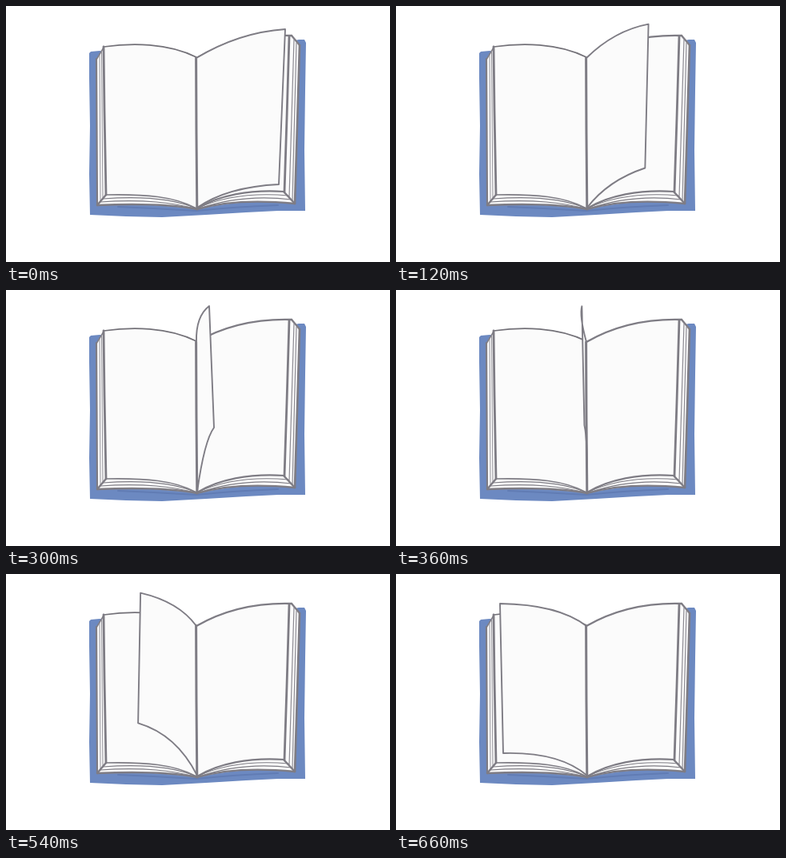
These frames come from a looping animation (480x320 px, 0.72 s). An HTML page with a canvas:

```html
<!DOCTYPE html>
<html lang="en">
<head>
<meta charset="utf-8">
<title>Turning page</title>
<style>
html, body { margin: 0; width: 100%; height: 100%; overflow: hidden; background: #fff; }
canvas { display: block; }
</style>
</head>
<body>
<canvas id="stage" width="480" height="320"></canvas>
<script>
const ctx = document.getElementById('stage').getContext('2d');
const STEP = 60, STEPS = 12;
const PAPER = '#fbfbfb', INK = '#7e7c84', BLUE = '#6c89c1';

// step, top corner, top bend, bottom corner, bottom bend
const poses = [
  [0, 349, 29, 291, 33, 341, 223, 277, 226],
  [1, 334, 25, 281, 33, 328, 212, 274, 222],
  [3, 296, 21, 264, 29, 294, 193, 256, 212],
  [5, 254, 20, 237, 33, 260, 172, 248, 188],
  [8, 189, 22, 218, 31, 184, 173, 221, 195],
  [10, 148, 27, 214, 39, 149, 205, 207, 209],
  [11, 130, 37, 203, 38, 134, 224, 204, 222]
];

function slope(i, k) {
  const a = poses[Math.max(i - 1, 0)], b = poses[Math.min(i + 1, poses.length - 1)];
  return (b[k] - a[k]) / (b[0] - a[0]);
}

// Cubic Hermite interpolation of the page pose
function poseAt(step) {
  let i = 0;
  while (i < poses.length - 2 && poses[i + 1][0] <= step) i++;
  const a = poses[i], b = poses[i + 1], span = b[0] - a[0];
  const u = (step - a[0]) / span, v = 1 - u;
  return a.slice(1).map((p, n) => {
    const k = n + 1;
    return v * v * (1 + 2 * u) * p + u * u * (3 - 2 * u) * b[k]
      + span * u * v * (v * slope(i, k) - u * slope(i + 1, k));
  });
}

function stroke(path, width, color = INK) {
  ctx.strokeStyle = color;
  ctx.lineWidth = width;
  ctx.stroke(new Path2D(path));
}

function fill(path, color) {
  ctx.fillStyle = color;
  ctx.fill(new Path2D(path));
}

function drawCover() {
  fill('M104 59 L106 57 L117 56 L240 70 L366 42 L373 42 L375 46 L374 105 L373 180 L374 256 ' +
    'L340 256 L300 258 L250 261 L195 264 L150 263 L105 261 L104 210 L105 150 L104 90 Z', BLUE);
  stroke('M140 251 Q190 253 238 256 Q285 251 340 249', 2, '#617cb4');
}

function drawLeft() {
  fill('M113 67 L122 51 C157 46 202 46 238 64 L239 254 Q185 246 114 249 Z', PAPER);
  stroke('M122 51 C157 46 202 46 238 64', 1.7, '#737178');
  stroke('M122 52 L113 67', 1.5);
  stroke('M113 66 L114 249', 2.2);
  stroke('M117 61 L118 244 M119.5 57 L121 241', 1, '#929097');
  stroke('M122 51 L123 130 L125 236', 2.8);
  stroke('M125 236 L114 249', 2.4);
  stroke('M125 236 C174 235 211 238 238 253', 1.7);
  stroke('M121 241 C173 237 212 242 238 253 M118 245 C170 241 212 246 238 254', 1.1);
  stroke('M114 249 C160 247 202 247 239 254', 2.3);
}

function drawRight() {
  fill('M238 64 Q291 35 357 37 L367 49 L361 247 Q300 240 239 254 Z', PAPER);
  stroke('M238 65 Q290 35 357 37', 2.4);
  stroke('M357 37 L367 49', 2.3);
  stroke('M367 49 L364 150 L361 247', 2.7);
  stroke('M360 42 L354 239 M363 46 L358 243', 1.2, '#8c8a92');
  stroke('M354 38 L351 140 L348 233', 2.8);
  stroke('M348 233 L361 247', 2.4);
  stroke('M348 232 C304 229 265 237 239 253', 2.2);
  stroke('M353 237 C306 233 267 240 239 253 M357 242 C308 236 270 243 239 254', 1.1);
  stroke('M361 247 C310 242 270 245 239 254', 2.3);
}

function drawTurningPage(step) {
  const [tx, ty, tbx, tby, bx, by, bbx, bby] = poseAt(step);
  const edge = `M238 65 Q${tbx} ${tby} ${tx} ${ty} L${bx} ${by} Q${bbx} ${bby} 239 252`;
  fill(edge + ' Z', PAPER);
  stroke(edge, 1.9);
}

function draw(now) {
  const step = Math.floor(now / STEP) % STEPS;
  ctx.fillStyle = '#fff';
  ctx.fillRect(0, 0, 480, 320);
  drawCover();
  drawLeft();
  drawRight();
  drawTurningPage(step);
  stroke('M237.6 65 L238 160 L238.8 254', 3);
  requestAnimationFrame(draw);
}

ctx.lineJoin = ctx.lineCap = 'round';
requestAnimationFrame(draw);
</script>
</body>
</html>
```
